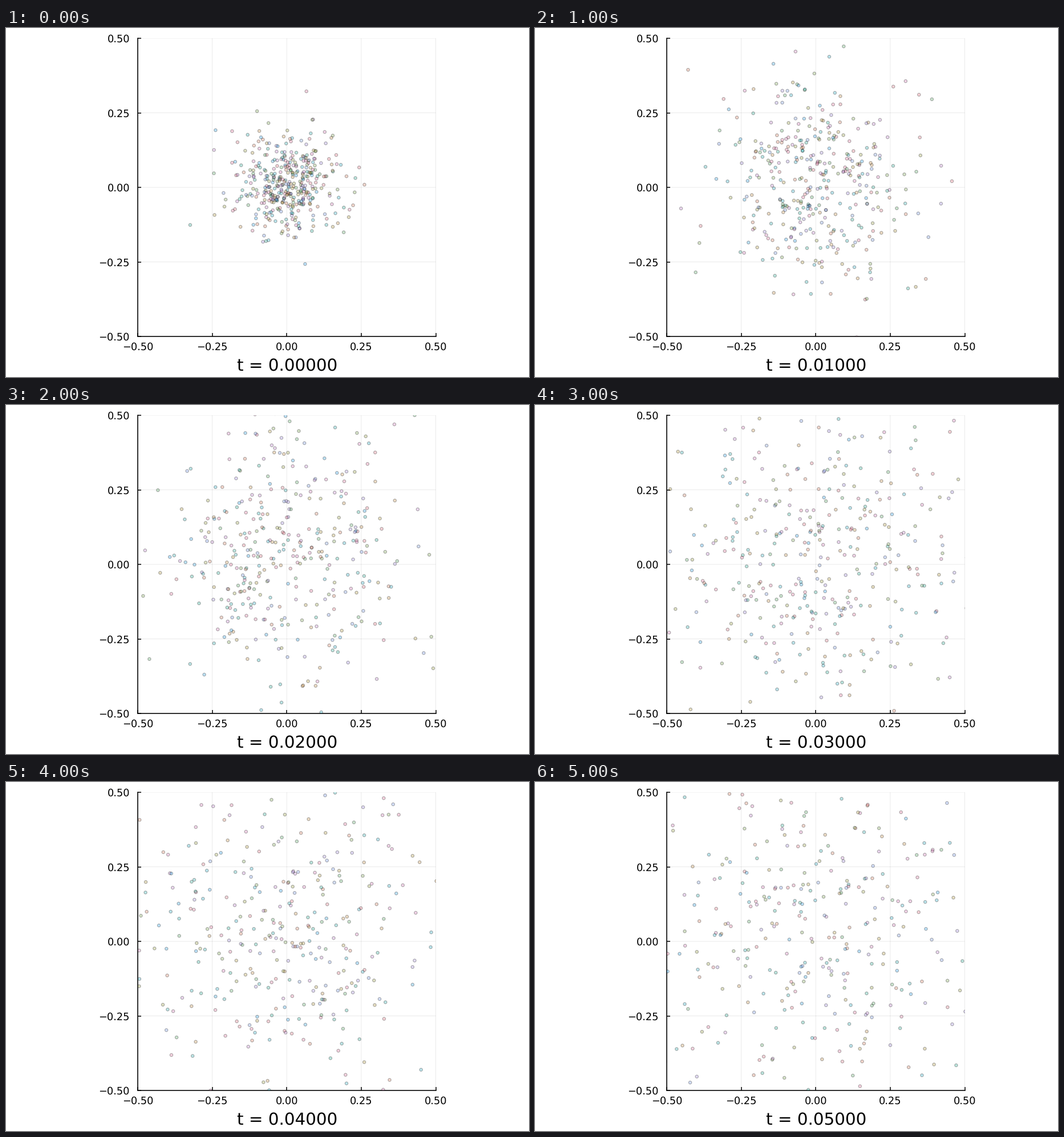
A matplotlib script for the animation above (6 s loop, 917 by 611 pixels).

```python
import numpy as np
import matplotlib as mpl
import matplotlib.pyplot as plt
from matplotlib.animation import FuncAnimation
from matplotlib.colors import to_rgba

W, H, DPI = 917, 611, 64
PX = 72 / DPI                       # points per pixel
LEFT, RIGHT, TOP, BOTTOM = 231, 753.5, 18, 540
N, DT, STEPS = 400, 0.01, 6
SPREAD = 0.092                      # deviation of the starting cloud

PALETTE = ["#009af9", "#e26f46", "#3da44d", "#c271d2", "#ac8d18", "#00a9ad",
           "#ed5d92", "#c68125", "#00a98d", "#8e971d", "#00a8cb", "#9b7fe8",
           "#608cf6", "#f05f73", "#dd64b5", "#6b9e32"]


def walk():
    """Brownian paths of all particles, shape (STEPS, N, 2)."""
    rng = np.random.default_rng(12)
    hops = rng.normal(0, np.sqrt(2 * DT), (STEPS, N, 2))
    hops[0] = rng.normal(0, SPREAD, (N, 2))
    return hops.cumsum(axis=0)


mpl.rcParams.update({"font.family": "DejaVu Sans", "text.hinting": "none"})
fig = plt.figure(figsize=(W / DPI, H / DPI), dpi=DPI, facecolor="white")
ax = fig.add_axes([LEFT / W, 1 - BOTTOM / H,
                   (RIGHT - LEFT) / W, (BOTTOM - TOP) / H])
ax.set(xlim=(-.5, .5), ylim=(-.5, .5), xticks=[], yticks=[])
ax.patch.set_visible(False)
for side, spine in ax.spines.items():
    spine.set_visible(side in ("left", "bottom"))
    spine.set(linewidth=1.6 * PX, color="black")


def put(x, y, text, size, ha="center"):
    """Text with its baseline at pixel y, counted from the top."""
    return fig.text(x / W, 1 - y / H, text, fontsize=size * PX,
                    ha=ha, va="baseline", color="black")


def rule(xs, ys, **style):
    ax.plot(xs, ys, solid_capstyle="butt", **style)


GRID = dict(color="black", alpha=0.1, lw=0.8 * PX, zorder=1, snap=False)
TICK = dict(color="black", lw=1.5 * PX, zorder=2, clip_on=False)
tick_end = -.5 + 6 / (RIGHT - LEFT)
for v in np.linspace(-.5, .5, 5):
    rule([v, v], [-.5, .5], **GRID)
    rule([-.5, .5], [v, v], **GRID)
    rule([v, v], [-.5, tick_end], **TICK)
    rule([-.5, tick_end], [v, v], **TICK)
    label = f"{v:.2f}".replace("-", "\u2212")
    put(LEFT + (v + .5) * (RIGHT - LEFT), 564, label, 17.8)
    put(217, BOTTOM - (v + .5) * (BOTTOM - TOP) + 6.8, label, 17.8, "right")

path = walk()
fills = [to_rgba(PALETTE[i % len(PALETTE)], 0.25) for i in range(N)]
dots = ax.scatter(*path[0].T, s=(5.2 * PX) ** 2, linewidths=1.3 * PX,
                  facecolors=fills, edgecolors=[(0, 0, 0, 0.28)], zorder=3)
clock = put((LEFT + RIGHT) / 2 + 0.5, 599.3, "t = 0.00000", 29.4)


def draw(i):
    dots.set_offsets(path[i])
    clock.set_text(f"t = {i * DT:.5f}")
    return dots, clock


anim = FuncAnimation(fig, draw, frames=STEPS, interval=1000,
                     init_func=lambda: draw(0), repeat=True, repeat_delay=0)
plt.show()
```
